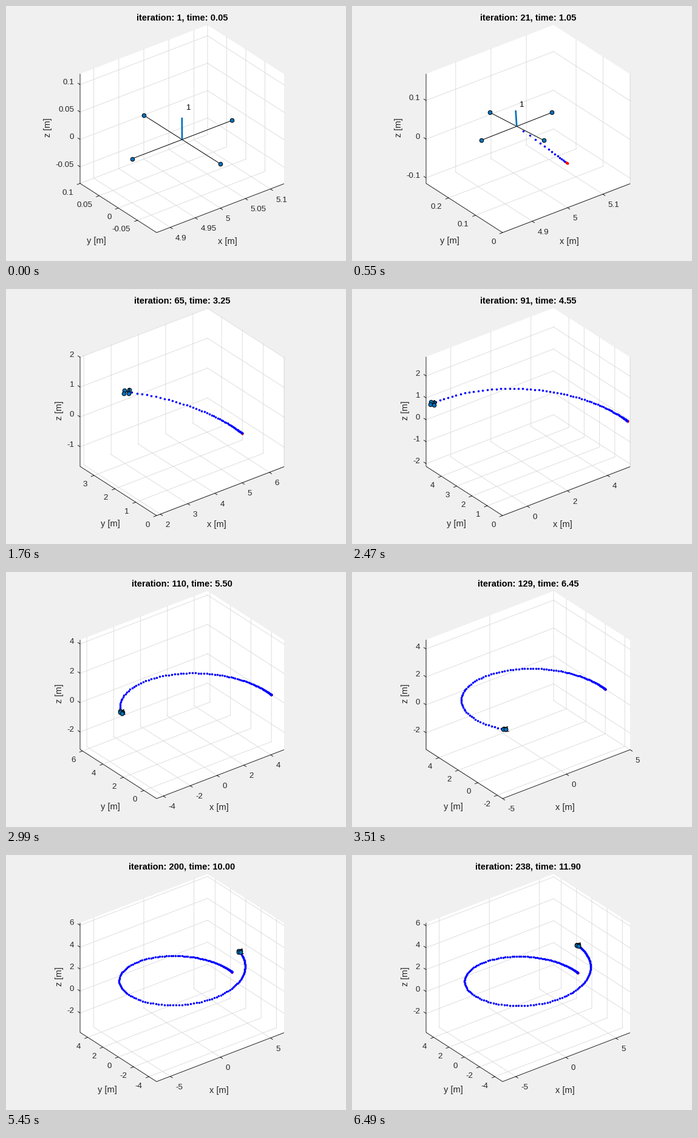
A matplotlib script that plays this animation: 560x420 px, repeating every 6590 ms.

```python
import numpy as np
import matplotlib.pyplot as plt
from matplotlib.animation import FuncAnimation

W, H, DPI = 560, 420, 100
PX = 72 / DPI                      # points per pixel
LOOP, TICK = 6590, 10              # ms
LAST = 238

RADIUS, RISE, T_END, DT = 5.0, 2.5, 12.0, 0.05
ARM, MAST = 0.1, 0.04
RED_UNTIL = 7                      # the earliest trail dots stay red

# Plot box on the stage: front corner, its three edges, relative side lengths
CORNER = np.array([248.0, 373.2])
EDGES = np.array([[210.0, -80.5], [-126.0, -81.0], [0.0, -180.5]])
SIDES = np.array([1.273, 1.0, 1.0])

INK = (0.15, 0.15, 0.15)
BLUE = (0, 0.447, 0.741)

plt.rcParams["font.family"] = "Liberation Sans"
plt.rcParams["axes.unicode_minus"] = False


def path(t):
    """Helix with a minimum-jerk angle profile."""
    s = np.clip(np.asarray(t, float) / T_END, 0, 1)
    s = s**3 * (10 - 15 * s + 6 * s**2)
    a = 2 * np.pi * s
    return np.stack([RADIUS * np.cos(a), RADIUS * np.sin(a), RISE * s], -1)


TRACK = path(np.arange(LAST + 1) * DT)


def attitude(t, h=0.01):
    """Body axes: thrust along acceleration plus gravity, zero yaw."""
    t = np.clip(t, h, T_END - h)
    acc = (path(t + h) - 2 * path(t) + path(t - h)) / h**2
    up = acc + [0, 0, 9.81]
    up /= np.linalg.norm(up)
    side = np.cross(up, [1, 0, 0])
    side /= np.linalg.norm(side)
    return np.cross(side, up), side, up


def iteration(ms):
    if ms < 1650:
        return 1 + 4 * (ms // 110)
    turn, rest = divmod(ms - 1650, 410)
    return min(61 + 15 * turn + 4 * min(rest // 110, 3), LAST)


def tick_step(span, axis):
    mag = 10 ** np.floor(np.log10(span / 5.1))
    for nice in (1, 2, 5):
        limit = 4.95 if axis == 0 and nice == 2 else 5.1
        if span <= limit * nice * mag:
            return nice * mag
    return 10 * mag


def ticks(lo, span, axis):
    step = tick_step(span, axis)
    eps = 1e-6 * span / step
    first = int(np.ceil(lo / step - eps))
    last = int(np.floor((lo + span) / step + eps))
    return [k * step for k in range(first, last + 1)]


def name(v):
    return f"{round(v, 6) + 0.0:g}"


def text_width(s):
    return sum({".": 0.278, "-": 0.333}.get(c, 0.556) for c in s) * 13.33


def on_stage(u):
    """Box coordinates 0..1 to stage pixels."""
    return CORNER + np.asarray(u, float) @ EDGES


def segments(pairs):
    gap = [np.nan, np.nan]
    return np.array([p for a, b in pairs for p in (a, b, gap)]).T


fig = plt.figure(figsize=(W / DPI, H / DPI), dpi=DPI, facecolor=(0.94,) * 3)
ax = fig.add_axes([0, 0, 1, 1])
ax.set_xlim(0, W)
ax.set_ylim(H, 0)
ax.axis("off")

hull = on_stage([[0, 0, 0], [1, 0, 0], [1, 0, 1], [1, 1, 1], [0, 1, 1], [0, 1, 0]])
ax.fill(*hull.T, color="white", lw=0, zorder=0)


def line(z, color, width=1.0, **kw):
    return ax.plot([], [], color=color, lw=width * PX, zorder=z, **kw)[0]


def dots(z, color, size, edge="none"):
    return ax.plot([], [], "o", ms=size * PX, mfc=color, mec=edge,
                   mew=PX if edge != "none" else 0, zorder=z, snap=False)[0]


def label(size, ha, va, color=INK, **kw):
    return ax.text(0, 0, "", fontsize=size * PX, ha=ha, va=va, color=color,
                   zorder=12, **kw)


grid = line(1, INK, alpha=0.15)
frame_lines = line(2, INK, solid_capstyle="butt")
red = dots(3, "red", 3.6)
blue = dots(4, "blue", 3.6)
arms = line(5, "black")
mast = line(6, BLUE, 2.7, solid_capstyle="butt")
far_motors = dots(7, BLUE, 6.6, "black")
tag = ax.text(0, 0, "1", fontsize=13.33 * PX, ha="left", va="baseline",
              color="black", zorder=8)
near_motors = dots(9, BLUE, 6.6, "black")

title = label(14.67, "center", "baseline", "black", weight="bold")
x_name = label(14.67, "center", "center")
y_name = label(14.67, "center", "center")
z_name = label(14.67, "center", "center", rotation=90)
x_name.set_text("x [m]")
y_name.set_text("y [m]")
z_name.set_text("z [m]")
tick_texts = [[label(13.33, ha, "baseline") for _ in range(8)]
              for ha in ("left", "right", "right")]

# Per axis: tick mark vector and label offset from the axis
MARKS = np.array([[4.0, 2.6], [-5.2, 2.0], [-4.0, -2.6]])
OFFSETS = np.array([[8.5, 21.2], [-11.2, 18.4], [-9.8, -0.3]])


def tick_geometry(axis, f):
    """Point on the drawn axis, and the two grid lines of one tick."""
    if axis == 0:
        rail = [f, 0, 0], [f, 1, 0], [f, 1, 1]
    elif axis == 1:
        rail = [0, f, 0], [1, f, 0], [1, f, 1]
    else:
        rail = [0, 1, f], [1, 1, f], [1, 0, f]
    a, b, c = on_stage(rail)
    return a, [(a, b), (b, c)]


def draw_axes(lo, span):
    grid_pairs = []
    corners = on_stage([[0, 1, 1], [0, 1, 0], [0, 0, 0], [1, 0, 0]])
    ink_pairs = list(zip(corners[:-1], corners[1:]))
    widest = []
    for axis in range(3):
        values = ticks(lo[axis], span[axis], axis)
        names = [name(v) for v in values]
        widest.append(max(map(text_width, names), default=0))
        for item in tick_texts[axis]:
            item.set_visible(False)
        for item, v, s in zip(tick_texts[axis], values, names):
            at, pairs = tick_geometry(axis, (v - lo[axis]) / span[axis])
            grid_pairs += pairs
            ink_pairs.append((at, at + MARKS[axis]))
            item.set_text(s)
            item.set_position(at + OFFSETS[axis])
            item.set_visible(True)
    grid.set_data(*segments(grid_pairs))
    frame_lines.set_data(*segments(ink_pairs))
    x_name.set_position((339.0 + widest[0], 388.2))
    y_name.set_position((179.2 - widest[1], 387.5))
    z_name.set_position((99.6 - widest[2], 200.5))


def update(n):
    it = iteration(n * TICK)
    t = it * DT
    pos = TRACK[it]
    bx, by, bz = attitude(t)
    motors = pos + ARM * np.array([bx, by, -bx, -by])
    top = pos + MAST * bz

    # Tight data limits, then equal scale on all axes
    data = np.vstack([TRACK[:it + 1], motors, top])
    low, high = data.min(0), data.max(0)
    span = ((high - low) / SIDES).max() * SIDES
    lo = (low + high - span) / 2

    def project(p):
        return on_stage((p - lo) / span)

    draw_axes(lo, span)
    trail = project(TRACK[1:it])
    red.set_data(*trail[:RED_UNTIL].T)
    blue.set_data(*trail[RED_UNTIL:].T)
    m = project(motors)
    arms.set_data(*segments([(m[0], m[2]), (m[1], m[3])]))
    mast.set_data(*project(np.array([pos, top])).T)
    far_motors.set_data(*m[:2].T)
    near_motors.set_data(*m[2:].T)
    tag.set_position(project(pos + ARM / 3) + [0, 5.5])
    title.set_position((290, 24))
    title.set_text(f"iteration: {it}, time: {t:.2f}")
    return []


anim = FuncAnimation(fig, update, frames=LOOP // TICK, interval=TICK,
                     init_func=lambda: update(0), repeat=True,
                     repeat_delay=0, blit=False, cache_frame_data=False)
plt.show()
```
